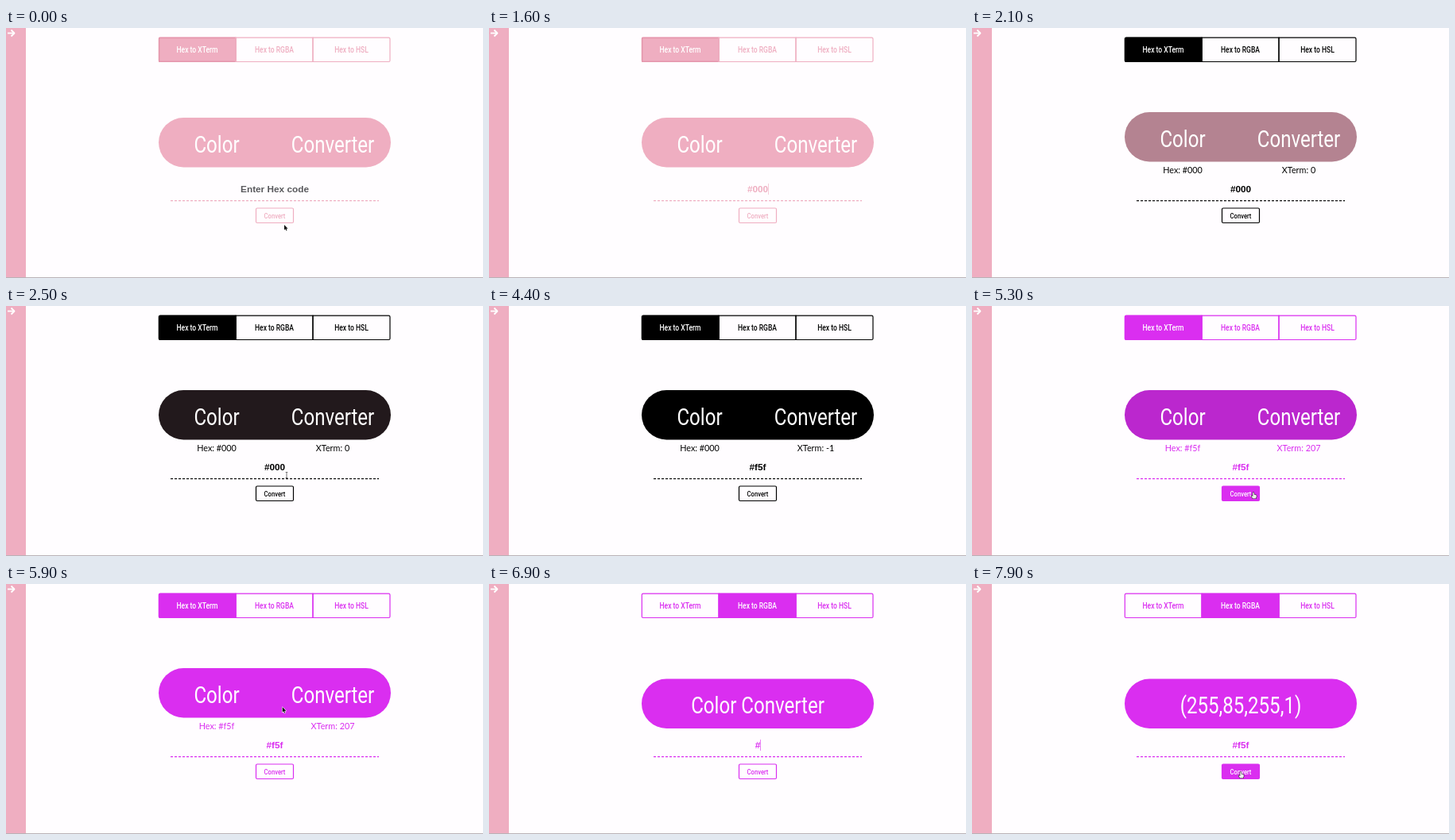
Recreate the animation shown at these times as an HTML page with a canvas. Size 600x315 px, loop 8000 ms.

```html
<!DOCTYPE html>
<html lang="en">
<head>
<meta charset="utf-8">
<title>Color Converter</title>
<style>
html, body { margin: 0; width: 100%; height: 100%; overflow: hidden; background: #fffdff; }
canvas { display: block; width: 100vw; height: 100vh; }
</style>
</head>
<body>
<canvas id="stage" width="600" height="315"></canvas>
<script>
const ctx = document.getElementById('stage').getContext('2d');
const LOOP = 8000, TICK = 100, FADE = 900;
const PAPER = '#fffdff', SIDE = '#efaec1';
const PINK = [239, 174, 193], BLACK = [0, 0, 0], VIOLET = [218, 46, 240];
const NARROW = 0.83; // one condensed cut for all headings and labels

const themes = [[0, PINK], [2000, BLACK], [4800, VIOLET]];
const typed = [
  [0, ''], [1100, '#'], [1200, '#0'], [1500, '#00'], [1600, '#000'],
  [3100, '#00'], [3200, '#0'], [3300, '#'],
  [4000, '#f'], [4200, '#f5'], [4300, '#f5f'],
  [6400, ''], [6900, '#'], [7100, '#f'], [7200, '#f5'], [7400, '#f5f']
];
const results = [[0, null], [2000, ['#000', '0']], [3100, ['#000', '-1']], [4800, ['#f5f', '207']]];
const tabs = [[0, 0], [6400, 1]];
const titles = [[0, 'Color Converter'], [7800, '(255,85,255,1)']];
const carets = [[0, false], [1000, true], [2000, false], [3100, true], [3700, false],
  [3900, true], [4400, false], [6800, true], [7500, false]];
const pointerShown = [[0, true], [1000, false], [2300, true], [3000, false],
  [4500, true], [6900, false], [7500, true]];
const pointerPath = [
  [0, 350, 248], [100, 350, 248], [800, 352, 207], [2300, 353, 207], [2500, 353, 213],
  [2900, 353, 208], [4500, 353, 212], [4700, 354, 235], [5600, 354, 235], [6300, 338, 32],
  [6500, 338, 30], [6800, 338, 205], [7500, 338, 206], [7700, 338, 237], [LOOP, 338, 237]
];

const at = (steps, t) => steps.filter(s => s[0] <= t).pop();
const valueAt = (steps, t) => at(steps, t)[1];
const mix = (a, b, p) => a + (b - a) * p;
const rgb = c => `rgb(${c.map(Math.round).join(',')})`;

function pointerAt(t) {
  const i = pointerPath.findIndex(k => k[0] > t);
  const [t0, x0, y0] = pointerPath[i - 1], [t1, x1, y1] = pointerPath[i];
  const p = (t - t0) / (t1 - t0), e = p * p * (3 - 2 * p);
  return { x: mix(x0, x1, e), y: mix(y0, y1, e) };
}

function pillColor(t) {
  const i = themes.indexOf(at(themes, t));
  if (!i) return rgb(PINK);
  const p = Math.min(1, (t - themes[i][0]) / FADE);
  const e = 1 - Math.pow(1 - p, 2.4);
  return rgb(themes[i][1].map((c, k) => mix(themes[i - 1][1][k], c, e)));
}

function text(str, x, y, font, color, squeeze = 1) {
  ctx.save();
  ctx.translate(x, y);
  ctx.scale(squeeze, 1);
  ctx.font = font;
  ctx.fillStyle = color;
  ctx.textAlign = 'center';
  ctx.fillText(str, 0, 0);
  ctx.restore();
}

const label = (str, x, y, size, color, weight = 500) =>
  text(str, x, y, `${weight} ${size}px Roboto, sans-serif`, color, NARROW);

function box(x, y, w, h, r, fill, stroke) {
  ctx.beginPath();
  ctx.roundRect(x, y, w, h, r);
  if (fill) { ctx.fillStyle = fill; ctx.fill(); }
  if (stroke) { ctx.strokeStyle = stroke; ctx.lineWidth = 1.2; ctx.stroke(); }
}

function line(points, color, width) {
  ctx.beginPath();
  points.forEach(([x, y]) => ctx.lineTo(x, y));
  ctx.strokeStyle = color;
  ctx.lineWidth = width;
  ctx.stroke();
}

function drawSidebar() {
  ctx.fillStyle = SIDE;
  ctx.fillRect(0, 0, 25, 315);
  line([[2, 6.5], [10.5, 6.5]], '#fff', 1.8);
  line([[6.5, 2.5], [10.5, 6.5], [6.5, 10.5]], '#fff', 1.8);
  ctx.fillStyle = '#b9b2b7';
  ctx.fillRect(0, 314, 600, 1);
}

function drawTabs(active, hover, color, focusRing) {
  box(192.3, 12.2, 290.7, 30.3, 1.5, PAPER, color);
  ['Hex to XTerm', 'Hex to RGBA', 'Hex to HSL'].forEach((name, i) => {
    const x = 192 + 97 * i, full = i === active || i === hover;
    if (full) box(x, 11.7, 97.5, 31.3, [i ? 0 : 2, 0, 0, i ? 0 : 2], color);
    if (i) line([[x, 11.7], [x, 43]], color, 1.7);
    if (i === active && focusRing) {
      ctx.strokeStyle = '#e597ad';
      ctx.lineWidth = 1.5;
      ctx.strokeRect(x + 0.75, 12.5, 96, 29.75);
    }
    label(name, x + 48.5, 31, 10.3, full ? '#fff' : color);
  });
}

function drawPill(t, tab, result) {
  const top = tab ? 119.5 : result ? 106 : 113;
  box(192, top, 292, 62.5, 31.25, pillColor(t));
  const base = top + 43.5;
  const big = (str, x) => label(str, x, base, 29, '#fff', 400);
  if (tab) {
    big(valueAt(titles, t), 338);
  } else {
    big('Color', 265);
    big('Converter', 411);
  }
}

function drawResult([hex, term], color) {
  const font = '10.8px Lato, sans-serif';
  text('Hex: ' + hex, 265, 183, font, color);
  text('XTerm: ' + term, 411, 183, font, color);
}

function drawInput(value, caret, color) {
  const font = 'bold 11.8px "Liberation Sans", sans-serif';
  text(value || 'Enter Hex code', 338, 207, font, value ? color : '#58585c');
  if (caret && value) {
    ctx.font = font;
    const x = Math.round(338 + ctx.measureText(value).width / 2) + 0.5;
    ctx.globalAlpha = 0.6;
    line([[x, 196], [x, 210]], color, 1);
    ctx.globalAlpha = 1;
  }
  ctx.setLineDash([3, 2]);
  line([[207, 217.7], [469, 217.7]], color, 1.2);
  ctx.setLineDash([]);
}

function drawButton(hover, color) {
  box(314.5, 227, 47, 18.5, 1.5, hover ? color : PAPER, color);
  label('Convert', 338, 239.5, 9.2, hover ? '#fff' : color);
}

function outline(x, y, points, fill, stroke) {
  ctx.beginPath();
  points.forEach(([px, py]) => ctx.lineTo(x + px, y + py));
  ctx.closePath();
  ctx.lineJoin = 'round';
  ctx.strokeStyle = stroke;
  ctx.lineWidth = 1.1;
  ctx.stroke();
  ctx.fillStyle = fill;
  ctx.fill();
}

function drawPointer({ x, y }, kind) {
  if (kind === 'hand') {
    outline(x, y, [[-0.7, 0], [0.6, 0], [0.8, 2.6], [3.6, 3.2], [3.9, 5], [3, 7.5],
      [-0.8, 7.5], [-2.6, 5], [-2.2, 4], [-0.7, 5]], '#eee', '#222');
  } else if (kind === 'beam') {
    line([[x, y - 3.5], [x, y + 3.5]], '#555', 0.8);
    [-3.5, 3.5].forEach(d => line([[x - 1.3, y + d], [x + 1.3, y + d]], '#555', 0.8));
  } else {
    outline(x, y, [[0, 0], [0, 6.5], [1.5, 5.2], [2.5, 7.6], [3.5, 7.1], [2.6, 4.8], [4.6, 4.7]],
      '#111', '#fff');
  }
}

function draw(t) {
  const color = rgb(valueAt(themes, t));
  const tab = valueAt(tabs, t), result = valueAt(results, t);
  const shown = valueAt(pointerShown, t), p = pointerAt(t);
  const inside = (x0, y0, x1, y1) => shown && p.x >= x0 && p.x <= x1 && p.y >= y0 && p.y <= y1;
  const onButton = inside(314, 227, 362, 246);
  const onTab = inside(192, 12, 483, 43) ? Math.floor((p.x - 192) / 97) : -1;
  const onInput = inside(207, 192, 469, 218);

  ctx.fillStyle = PAPER;
  ctx.fillRect(0, 0, 600, 315);
  drawSidebar();
  drawTabs(tab, onTab, color, t < 2000);
  drawPill(t, tab, result);
  if (result && !tab) drawResult(result, color);
  drawInput(valueAt(typed, t), valueAt(carets, t), color);
  drawButton(onButton, color);
  if (shown) drawPointer(p, onButton || onTab >= 0 ? 'hand' : onInput ? 'beam' : 'arrow');
}

function frame() {
  const t = performance.now() % LOOP;
  draw(Math.floor(t / TICK) * TICK);
  requestAnimationFrame(frame);
}
frame();
</script>
</body>
</html>
```
